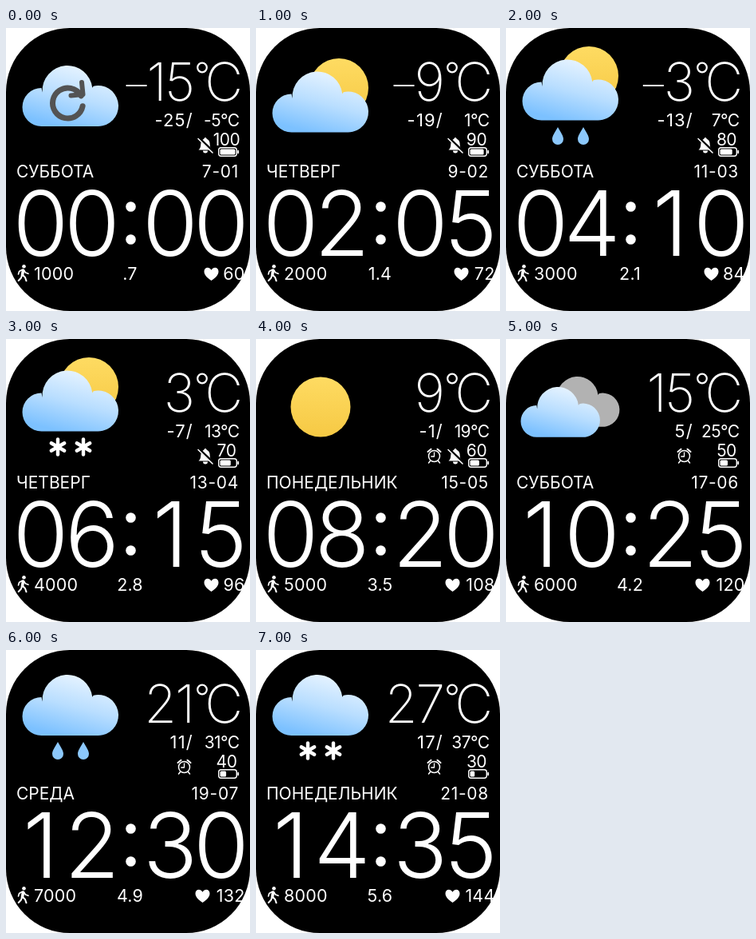
An HTML page with a canvas for the animation above (8 s loop, 306x354 px).

```html
<!DOCTYPE html>
<html lang="ru">
<head>
<meta charset="utf-8">
<style>
html, body { margin: 0; width: 100%; height: 100%; overflow: hidden; background: #fff; }
canvas { display: block; width: 306px; height: 354px; }
</style>
</head>
<body>
<canvas id="face"></canvas>
<script>
const W = 306, H = 354, STEP = 1000, COUNT = 8;
const canvas = document.getElementById('face');
const ctx = canvas.getContext('2d');
const ratio = window.devicePixelRatio || 1;
canvas.width = W * ratio;
canvas.height = H * ratio;

const DAYS = ['СУББОТА', 'ЧЕТВЕРГ', 'СУББОТА', 'ЧЕТВЕРГ',
              'ПОНЕДЕЛЬНИК', 'СУББОТА', 'СРЕДА', 'ПОНЕДЕЛЬНИК'];
const two = n => String(n).padStart(2, '0');

function text(str, x, y, { size = 21, weight = 400, align = 'left', spacing = 0 } = {}) {
  ctx.font = `${weight} ${size}px Inter, "Open Sans", sans-serif`;
  ctx.letterSpacing = spacing + 'px';
  ctx.textAlign = align;
  ctx.fillStyle = '#fff';
  ctx.fillText(str, x, y);
  return ctx.measureText(str).width;
}

function disc(x, y, r, fill = '#fff') {
  ctx.fillStyle = fill;
  ctx.beginPath();
  ctx.arc(x, y, r, 0, 2 * Math.PI);
  ctx.fill();
}

function polyline(points, width, color = '#fff') {
  ctx.strokeStyle = color;
  ctx.lineWidth = width;
  ctx.lineCap = ctx.lineJoin = 'round';
  ctx.beginPath();
  points.forEach(([x, y]) => ctx.lineTo(x, y));
  ctx.stroke();
}

function ring(x, y, r, width, from = 0, to = 2 * Math.PI, color = '#fff') {
  ctx.strokeStyle = color;
  ctx.lineWidth = width;
  ctx.beginPath();
  ctx.arc(x, y, r, from, to);
  ctx.stroke();
}

function gradient(x0, y0, x1, y1, ...colors) {
  const g = ctx.createLinearGradient(x0, y0, x1, y1);
  colors.forEach((c, i) => g.addColorStop(i / (colors.length - 1), c));
  return g;
}

// Cloud of 120 x 76 at scale 1, placed by its top left corner.
function cloud(x, y, scale = 1, fill) {
  ctx.save();
  ctx.translate(x, y);
  ctx.scale(scale, scale);
  ctx.fillStyle = fill || gradient(68, 0, 48, 76, '#e6f3ff', '#b9deff', '#7cc1ff');
  ctx.beginPath();
  ctx.moveTo(24, 76);
  ctx.arc(24, 52, 24, Math.PI / 2, -Math.PI / 2);
  ctx.arc(56.5, 31.5, 31.5, Math.PI * 0.98, -0.12);
  ctx.arc(95, 50.5, 25.5, -1.8, Math.PI / 2);
  ctx.closePath();
  ctx.fill();
  ctx.restore();
}

function sun(x, y, r) {
  disc(x, y, r, gradient(x, y - r, x, y + r, '#fedb62', '#f6c944'));
}

function flake(x, y) {
  for (let k = 0; k < 3; k++) {
    const a = Math.PI / 2 + k * Math.PI / 3, dx = 9.5 * Math.cos(a), dy = 9.5 * Math.sin(a);
    polyline([[x - dx, y - dy], [x + dx, y + dy]], 4.4);
  }
}

function drop(x, y) {
  ctx.fillStyle = '#8cc8fc';
  ctx.beginPath();
  ctx.moveTo(x, y - 11);
  ctx.bezierCurveTo(x + 4, y - 4, x + 7, y, x + 7, y + 4);
  ctx.arc(x, y + 4, 7, 0, Math.PI);
  ctx.bezierCurveTo(x - 7, y, x - 4, y - 4, x, y - 11);
  ctx.fill();
}

function pair(shape, y) {
  shape(65, y);
  shape(97, y);
}

function sunCloud(top) {
  sun(104, top + 37, 37);
  cloud(20.5, top + 16.5);
}

function refreshCloud() {
  cloud(20.5, 47);
  ctx.lineCap = 'round';
  ring(77.5, 94, 19, 7, 0.2, Math.PI * 1.84, '#535353');
  polyline([[95, 68], [96.5, 83], [81.5, 84.5]], 6, '#535353');
}

const WEATHER = [
  refreshCloud,
  () => sunCloud(38),
  () => { sunCloud(23); pair(drop, 135); },
  () => { sunCloud(23); pair(flake, 135); },
  () => sun(81, 85, 37.5),
  () => { cloud(43, 47, 0.825, '#b2b2b2'); cloud(18.5, 60, 0.825); },
  () => { cloud(20.5, 31); pair(drop, 126); },
  () => { cloud(20.5, 31); pair(flake, 126); }
];

function temperature(now) {
  const big = { size: 66, weight: 200, align: 'right', spacing: -2 };
  const width = text(Math.abs(now), 235, 90.5, big);
  if (now < 0) {
    ctx.fillRect(235 - width - 26, 71, 26, 2);
  }
  ring(246, 49.5, 5.8, 2.2);
  text('C', 295, 90.5, big);

  text(now - 10 + '/', 235, 123, { size: 22, align: 'right', spacing: 1.2 });
  text(now + 10 + '°C', 292.5, 123, { align: 'right', spacing: -0.6 });
}

function battery(level) {
  text(level, 276.5, 147, { align: 'center', spacing: -0.5 });
  ctx.strokeStyle = '#fff';
  ctx.lineWidth = 1.4;
  ctx.beginPath();
  ctx.roundRect(266.7, 149.7, 22.6, 10.6, 3);
  ctx.stroke();
  ctx.beginPath();
  ctx.roundRect(268.5, 151.5, 19 * level / 100, 7, 1.5);
  ctx.roundRect(290.3, 152.8, 1.8, 4.4, 0.9);
  ctx.fill();
}

function mutedBell() {
  ctx.fillStyle = '#fff';
  ctx.beginPath();
  ctx.moveTo(241.5, 152.5);
  ctx.bezierCurveTo(245.5, 149, 243.5, 145, 245, 142);
  ctx.bezierCurveTo(246.2, 139, 248.2, 139.4, 248.6, 138);
  ctx.bezierCurveTo(249, 136.6, 251, 136.6, 251.4, 138);
  ctx.bezierCurveTo(251.8, 139.4, 253.8, 139, 255, 142);
  ctx.bezierCurveTo(256.5, 145, 254.5, 149, 258.5, 152.5);
  ctx.closePath();
  ctx.fill();
  ctx.beginPath();
  ctx.arc(250, 153.5, 3, 0, Math.PI);
  ctx.fill();
  polyline([[242, 138], [260, 155]], 3.6, '#000');
  polyline([[241, 138.5], [259, 156]], 1.6);
}

function alarm() {
  ring(223.5, 146.5, 7, 1.5);
  polyline([[223.5, 142], [223.5, 147], [219.8, 147]], 1.3);
  polyline([[215.5, 141], [219.5, 137.7]], 2);
  polyline([[231.5, 141], [227.5, 137.7]], 2);
  polyline([[218.5, 152.5], [216.5, 155]], 1.5);
  polyline([[228.5, 152.5], [230.5, 155]], 1.5);
}

function clock(hours, minutes) {
  const centers = [43.5, 108, 206, 270];
  [...two(hours) + two(minutes)].forEach((digit, k) =>
    text(digit, centers[k], 285.3, { size: 113, weight: 340, align: 'center' }));
  disc(156.5, 223.5, 6.3);
  disc(156.5, 264.5, 6.3);
}

function walker() {
  disc(22.5, 298.3, 2.3);
  polyline([[21.5, 303], [20.5, 309]], 3.6);
  polyline([[20.5, 302.3], [16.5, 304.5], [15.5, 308]], 1.6);
  polyline([[22.5, 303], [24.5, 306], [28, 307.3]], 1.6);
  polyline([[21, 309], [24, 312], [25.5, 316.3]], 2);
  polyline([[20, 309], [19, 312.5], [15.7, 316]], 2);
}

function heart(x, y) {
  ctx.fillStyle = '#fff';
  ctx.beginPath();
  ctx.moveTo(x, y + 8.5);
  ctx.bezierCurveTo(x - 6, y + 4.5, x - 9, y + 1, x - 9, y - 3);
  ctx.bezierCurveTo(x - 9, y - 8.5, x - 2.5, y - 9.5, x, y - 4.7);
  ctx.bezierCurveTo(x + 2.5, y - 9.5, x + 9, y - 8.5, x + 9, y - 3);
  ctx.bezierCurveTo(x + 9, y + 1, x + 6, y + 4.5, x, y + 8.5);
  ctx.fill();
}

function activity(i) {
  const pulse = 60 + 12 * i;
  const style = { size: 21.5, spacing: 0.2 };
  walker();
  text(1000 * (i + 1), 35, 315, style);
  text((0.7 * (i + 1)).toFixed(1).replace(/^0/, ''), 155.5, 315, { ...style, align: 'center' });
  heart(pulse < 100 ? 257.5 : 246.5, 307.5);
  text(pulse, 299.5, 315, { ...style, align: 'right' });
}

function draw(i) {
  ctx.setTransform(ratio, 0, 0, ratio, 0, 0);
  ctx.fillStyle = '#fff';
  ctx.fillRect(0, 0, W, H);
  ctx.fillStyle = '#000';
  ctx.beginPath();
  ctx.roundRect(0, 0, W, H, 80);
  ctx.fill();

  WEATHER[i]();
  temperature(6 * i - 15);
  if (i < 5) mutedBell();
  if (i > 3) alarm();
  battery(100 - 10 * i);
  text(DAYS[i], 13, 187);
  text(`${7 + 2 * i}-${two(i + 1)}`, 292, 187, { align: 'right', spacing: 0.7 });
  clock(2 * i, 5 * i);
  activity(i);
}

const start = performance.now();
function tick() {
  draw(Math.floor((performance.now() - start) / STEP) % COUNT);
  requestAnimationFrame(tick);
}
tick();
</script>
</body>
</html>
```
